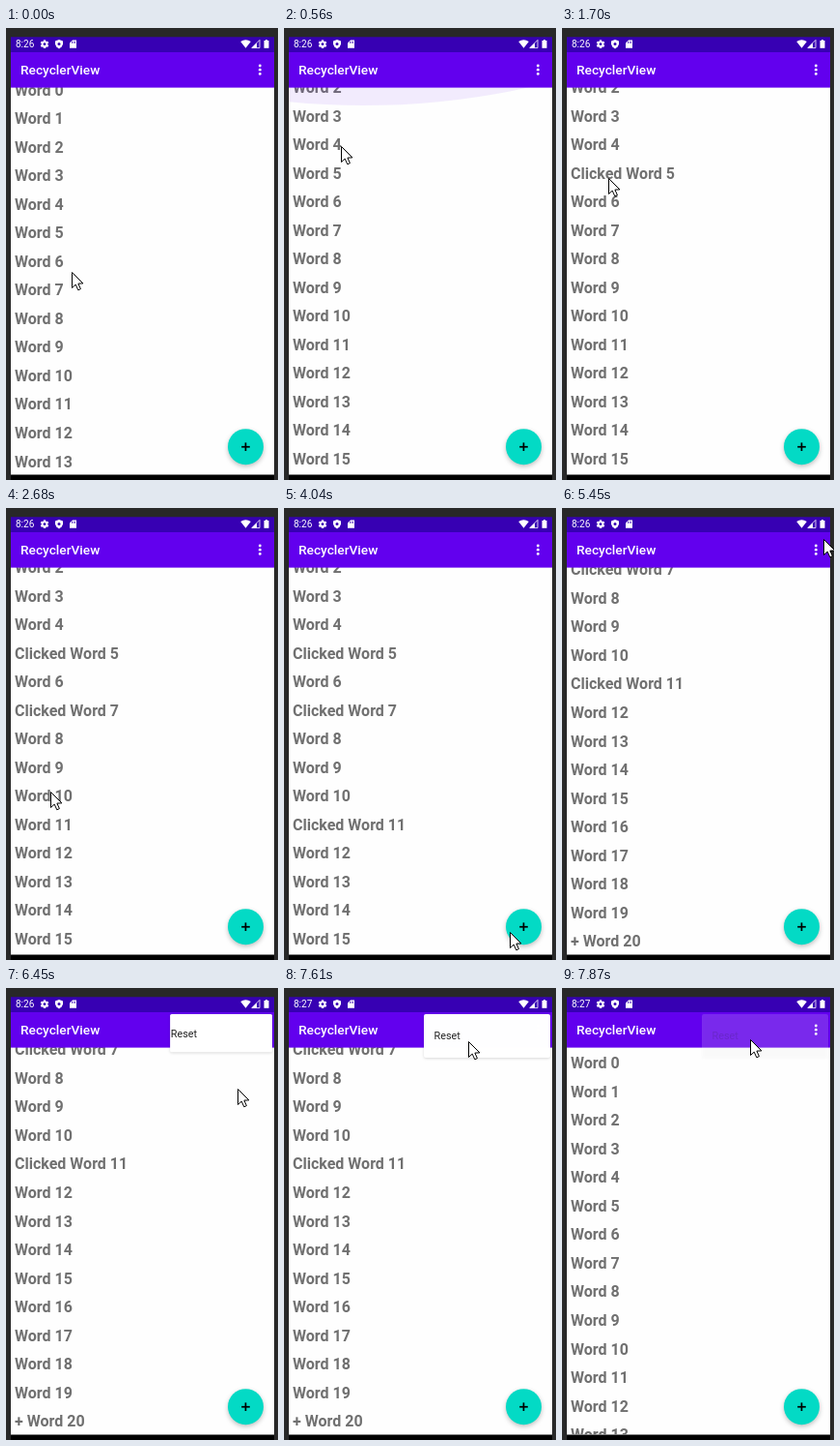
These frames come from a looping animation (282x467 px, 8 s). An HTML page with a canvas:

```html
<!DOCTYPE html>
<html lang="en">
<head>
<meta charset="utf-8">
<title>RecyclerView</title>
<style>
  html, body { margin: 0; width: 100%; height: 100%; overflow: hidden; background: #282828; }
  canvas { display: block; width: 282px; height: 467px; }
</style>
</head>
<body>
<canvas id="stage" width="282" height="467"></canvas>
<script>
const c = document.getElementById('stage').getContext('2d');
const LOOP = 8000, PITCH = 29.54;
const ADDED = 4480, RESET = 7700, CLOCK_TICK = 6700;
const clicks = { 5: 1700, 7: 2440, 11: 3260 };

// Pointer stops: [time, x, y]
const stops = [
  [270, 68, 252], [560, 59, 122], [1130, 48, 150], [1700, 48, 155],
  [2000, 48, 209], [2440, 48, 211], [2680, 46, 293], [2950, 48, 313],
  [3260, 48, 313], [4040, 234, 438], [4480, 249, 438], [5450, 271, 32],
  [6160, 264, 43], [6450, 240, 104], [6970, 180, 59], [7870, 195, 53]
];

const ramp = (t, a, b) => Math.min(1, Math.max(0, (t - a) / (b - a)));
const ease = p => (1 - Math.cos(Math.PI * p)) / 2;

function pointerAt(t) {
  let [, x, y] = stops[0];
  for (let i = 1; i < stops.length; i++) {
    const p = ramp(t, stops[i - 1][0], stops[i][0]);
    x += (stops[i][1] - x) * p;
    y += (stops[i][2] - y) * p;
    if (p < 1) break;
  }
  return [x, y];
}

function rect(color, x, y, w, h) {
  c.fillStyle = color;
  c.fillRect(x, y, w, h);
}

function disc(color, x, y, r) {
  c.fillStyle = color;
  c.beginPath();
  c.arc(x, y, r, 0, 7);
  c.fill();
}

function poly(color, ...pts) {
  c.fillStyle = color;
  c.beginPath();
  for (let i = 0; i < pts.length; i += 2) c.lineTo(pts[i], pts[i + 1]);
  c.closePath();
  c.fill();
}

function outline(color, width) {
  c.strokeStyle = color;
  c.lineWidth = width;
  c.stroke();
}

function text(s, x, y, font, color) {
  c.font = font + ' Roboto, sans-serif';
  c.fillStyle = color;
  c.fillText(s, x, y);
}

function clipped(x, y, w, h, draw) {
  c.save();
  c.beginPath();
  c.rect(x, y, w, h);
  c.clip();
  draw();
  c.restore();
}

function shadow(blur, dy, alpha) {
  c.shadowBlur = blur;
  c.shadowOffsetY = dy;
  c.shadowColor = `rgba(0,0,0,${alpha})`;
}

function list(t) {
  const fresh = t >= RESET;
  const top = fresh ? 77.5
    : 63.9 - 61.6 * ease(ramp(t, 270, 560)) - 145.4 * ease(ramp(t, 4550, 5200));
  const count = t >= ADDED && !fresh ? 21 : 20;
  for (let i = 0; i < count; i++) {
    const prefix = i === 20 ? '+ ' : !fresh && t >= clicks[i] ? 'Clicked ' : '';
    text(prefix + 'Word ' + i, 9, top + i * PITCH + 5.6, 'bold 16px', '#707070');
  }
  const glow = ramp(t, 270, 560) - ramp(t, 570, 1000);
  if (glow > 0) disc(`rgba(98,0,238,${.075 * glow})`, 82, 62 + 18 * glow - 800, 800);
}

function statusBar(t) {
  rect('#3700b3', 5, 9.3, 273, 16);
  text(t >= CLOCK_TICK ? '8:27' : '8:26', 10, 20, '10px', '#fff');
  // gear
  c.save();
  c.translate(40, 16.7);
  for (let i = 0; i < 3; i++) {
    rect('#fff', -1.2, -4.3, 2.4, 8.6);
    c.rotate(Math.PI / 3);
  }
  c.restore();
  disc('#fff', 40, 16.7, 3.1);
  disc('#3700b3', 40, 16.7, 1.4);
  // shield
  poly('#fff', 55, 12, 59, 13.5, 59, 16.7, 57.6, 19.6, 55, 21.4, 52.4, 19.6, 51, 16.7, 51, 13.5);
  disc('#3700b3', 55, 16.4, 1.5);
  // memory card
  poly('#fff', 69, 12.5, 73, 12.5, 73, 20.8, 66, 20.8, 66, 15.5);
  for (let i = 0; i < 3; i++) rect('#3700b3', 68.2 + i * 1.5, 13.8, .7, 2);
  // wifi
  c.fillStyle = '#fff';
  c.beginPath();
  c.moveTo(248.5, 20.7);
  c.lineTo(243.2, 14.1);
  c.quadraticCurveTo(248.5, 10.3, 253.8, 14.1);
  c.fill();
  // signal
  poly('#3700b3', 263, 12.4, 263, 20.6, 254.8, 20.6);
  outline('#fff', .8);
  poly('#fff', 260, 15.4, 260, 20.6, 254.8, 20.6);
  // battery
  rect('#fff', 267.5, 13, 5, 7.8);
  rect('#fff', 269, 12, 2, 1);
}

function appBar() {
  rect('#6200ee', 5, 25, 273, 36.6);
  text('RecyclerView', 15, 48, '500 13.7px', '#fff');
  for (let i = -1; i < 2; i++) disc('#fff', 263.3, 43.2 + 4.2 * i, 1.4);
}

function addButton() {
  shadow(5, 2, .25);
  disc('#03dac5', 248.5, 432.7, 18.5);
  shadow(0, 0, 0);
  rect('#000', 244.2, 431.9, 8.6, 1.7);
  rect('#000', 247.6, 428.4, 1.7, 8.6);
}

function menu(t) {
  const open = ramp(t, 6160, 6520);
  if (!open) return;
  const rest = 1 - open, x = 145 + 131 * rest, h = 45 - 30 * rest;
  c.save();
  c.globalAlpha = 1 - .84 * ramp(t, 7610, 7870);
  shadow(3, 1, .15);
  c.fillStyle = '#fff';
  c.beginPath();
  c.roundRect(x, 27, 276 - x, h, 2 * open);
  c.fill();
  shadow(0, 0, 0);
  clipped(x, 27, 276 - x, h, () =>
    text('Reset', 155.5 + 80 * rest, 53 - 10 * rest, '10.8px', '#212121'));
  c.restore();
}

function pointer(t) {
  const [x, y] = pointerAt(t);
  c.save();
  c.translate(Math.round(x) + .5, Math.round(y) + .5);
  poly('#fff', 0, 0, 0, 16, 3.7, 12.6, 6.3, 18.3, 8.9, 17.1, 6.4, 11.6, 11.4, 11.4);
  outline('#000', 1);
  c.restore();
}

function draw(t) {
  rect('#282828', 0, 0, 282, 467);
  rect('#000', 5, 461, 273, 6);
  rect('#fefefe', 5, 61, 273, 400.5);
  clipped(5, 61, 273, 400.5, () => {
    list(t);
    addButton();
  });
  statusBar(t);
  appBar();
  menu(t);
  pointer(t);
}

const start = performance.now();
function frame() {
  draw((performance.now() - start) % LOOP);
  requestAnimationFrame(frame);
}
frame();
</script>
</body>
</html>
```
